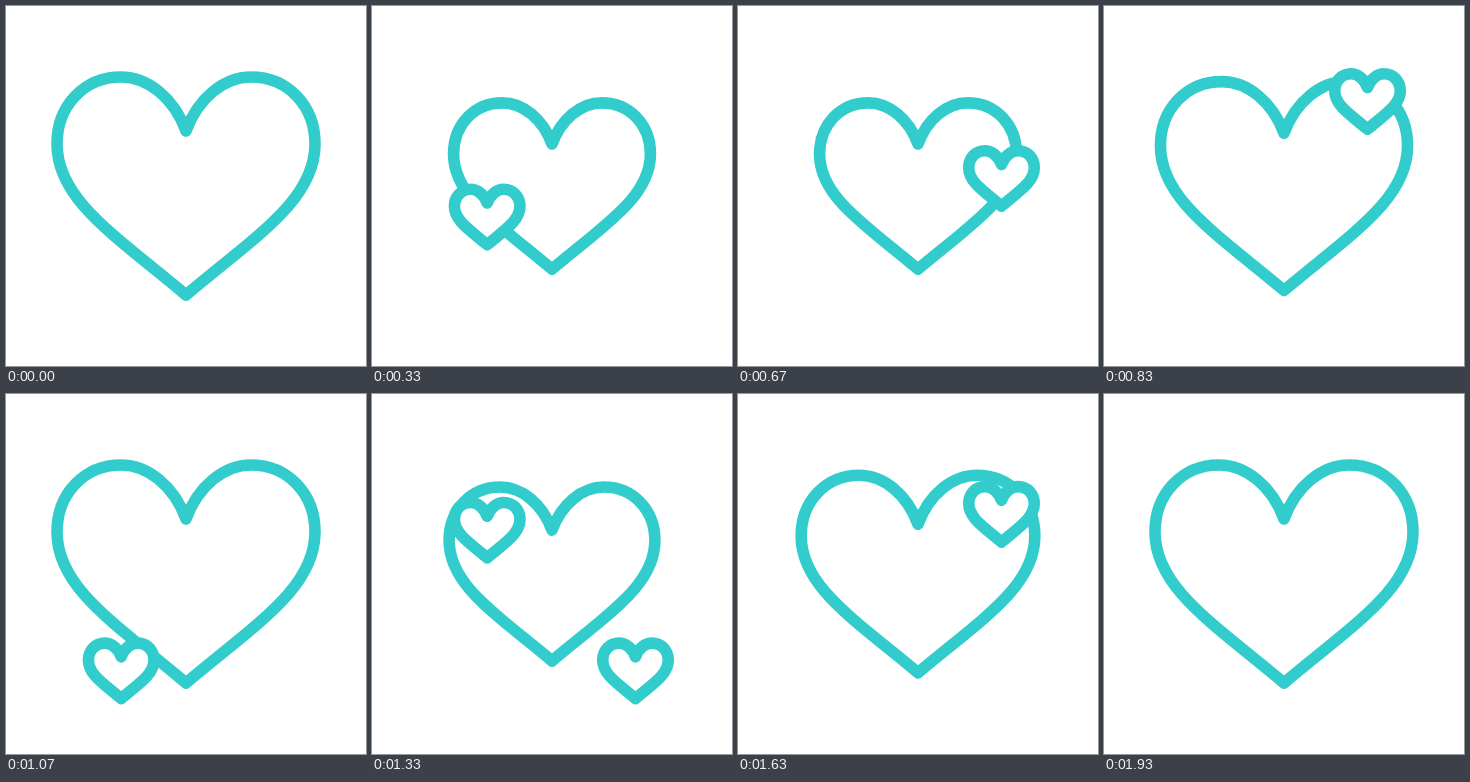
An HTML page that plays this animation: 360 px wide and 360 px high, repeating every 2 s.

```html
<!DOCTYPE html>
<html lang="en">
<head>
<meta charset="utf-8">
<title>Beating heart</title>
<style>
  html, body { margin: 0; width: 100%; height: 100%; overflow: hidden; background: #fff; }
  svg { display: block; width: 360px; height: 360px; }
  path {
    fill: #fff;
    stroke: #33cccc;
    stroke-width: 11.6;
    stroke-linejoin: round;
    vector-effect: non-scaling-stroke;
  }
</style>
</head>
<body>
<svg viewBox="0 0 360 360">
  <defs>
    <path id="heart" d="M0-55C12-88 38-109 65-109C102-109 129-80 129-42C129 14 70 50 0 109C-70 50-129 14-129-42C-129-80-102-109-65-109C-38-109-12-88 0-55Z"/>
  </defs>
  <use id="big" href="#heart"/>
  <use id="left" href="#heart"/>
  <use id="right" href="#heart"/>
</svg>
<script>
  const LOOP = 2000, FPS = 30;
  const SMALL = 0.254, MIN = 0.763;
  const RISE = 18, FADE = 3, LOW = 302.8, HIGH = 80.6;

  const big = document.getElementById('big');
  const risers = [
    { el: document.getElementById('left'), x: 115.2, starts: [2, 28] },
    { el: document.getElementById('right'), x: 263.5, starts: [10, 36] }
  ];

  const clamp = v => Math.min(1, Math.max(0, v));
  const easeInOut = p => (1 - Math.cos(Math.PI * p)) / 2;
  const easeOut = p => 1 - (1 - p) ** 3.2;
  const span = (n, from, to) => clamp((n - from) / (to - from));

  function place(el, x, y, scale) {
    el.setAttribute('transform', `translate(${x} ${y}) scale(${scale})`);
  }

  // Two beats: contract, hold, swell back.
  function beat(n) {
    const [shrink, swell] = n < 33 ? [2, 20] : [34, 46];
    const squeeze = easeInOut(span(n, shrink, shrink + 8)) - easeOut(span(n, swell, swell + 12));
    return 1 - (1 - MIN) * squeeze;
  }

  function rise({ el, x, starts }, n) {
    const start = n < starts[1] ? starts[0] : starts[1];
    const age = n - start;
    const y = LOW + (HIGH - LOW) * easeInOut(clamp(age / RISE));
    place(el, x, y, SMALL);
    el.setAttribute('opacity', clamp(Math.min(age, RISE - age) / FADE));
  }

  const begin = performance.now();

  function draw() {
    const t = (performance.now() - begin) % LOOP;
    // Whole ticks, with a little slack for rounded tick times.
    const n = Math.floor(t * FPS / 1000 + 0.15);
    place(big, 180, 180, beat(n));
    risers.forEach(r => rise(r, n));
    requestAnimationFrame(draw);
  }
  draw();
</script>
</body>
</html>
```
